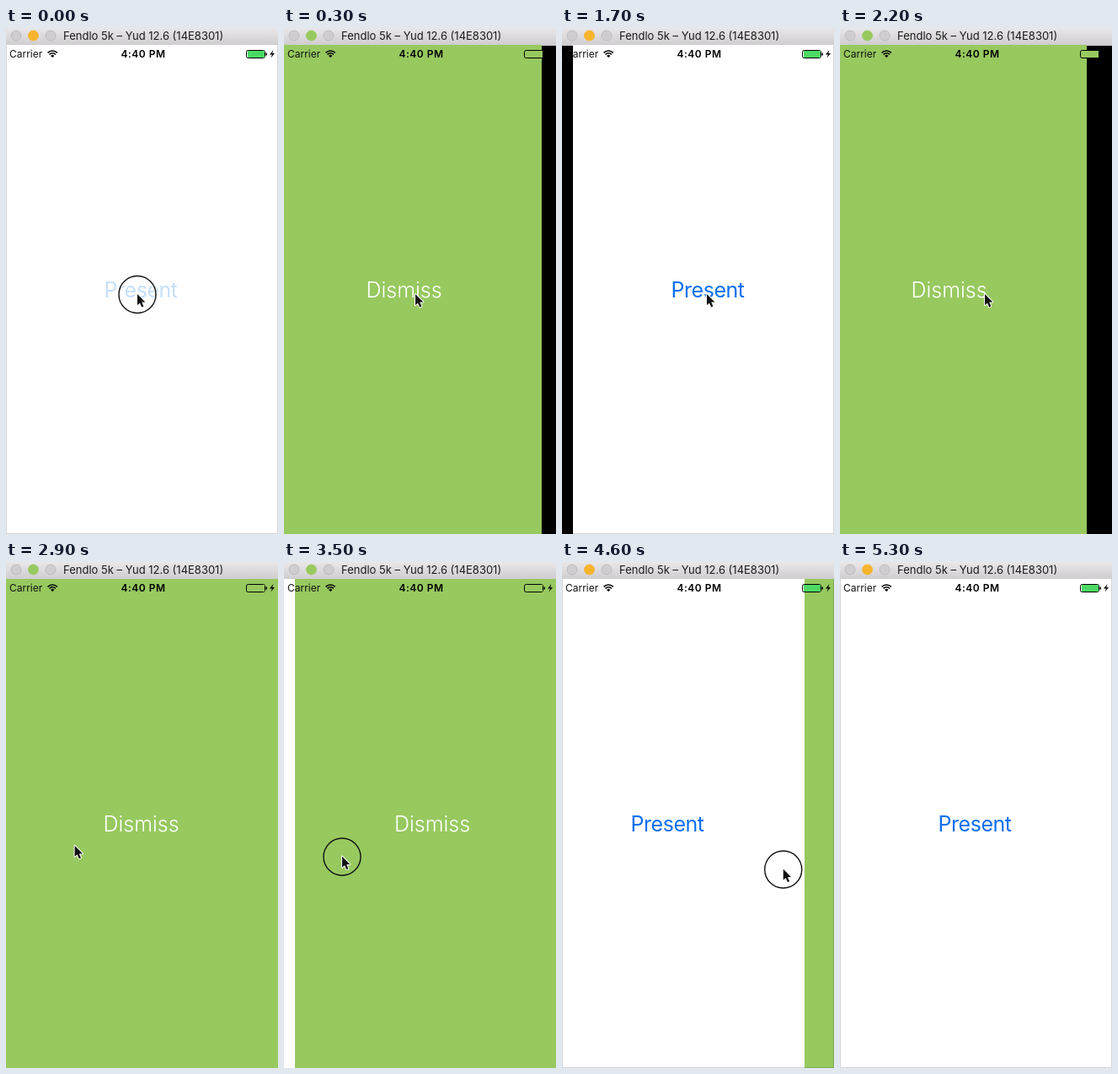
Recreate the animation shown at these times as an HTML page with a canvas. Size 323x599 px, loop 5.4 s.

```html
<!DOCTYPE html>
<html lang="en">
<head>
<meta charset="utf-8">
<style>
html, body { margin: 0; width: 100%; height: 100%; overflow: hidden; background: #fff; }
canvas { display: block; }
</style>
</head>
<body>
<canvas id="stage" width="323" height="599"></canvas>
<script>
const c = document.getElementById('stage').getContext('2d');
const W = 323, H = 599, BAR = 20, LOOP = 5400, STEP = 100;
const GREEN = '#97c95f', BLUE = '#0a6ff0', YELLOW = '#f6b42d';

// Pointer path: time, x, y
const PATH = [
  [0, 156, 315], [700, 156, 315], [1000, 172, 315], [2500, 172, 315],
  [3000, 59, 341], [3300, 60, 348], [3500, 69, 348.5], [3600, 84, 350],
  [4100, 201.5, 361], [4700, 275, 364], [4800, 276, 364], [5200, 340, 366], [LOOP, 340, 366]
];

function pointerAt(t) {
  const i = Math.max(1, PATH.findIndex(p => p[0] >= t));
  const a = PATH[i - 1], b = PATH[i];
  const k = (t - a[0]) / (b[0] - a[0]);
  return { x: a[1] + (b[1] - a[1]) * k, y: a[2] + (b[2] - a[2]) * k };
}

// Underdamped spring from 1 to 0, time in ms
function spring(ms) {
  const s = Math.max(0, ms) / 1000;
  return Math.exp(-6.75 * s) * (Math.cos(9 * s) + 0.75 * Math.sin(9 * s));
}

// Left edge of the green screen
function panelAt(t) {
  if (t < 1219) return W * spring(t - 20);
  if (t < 1850) return W * (1 - spring(t - 1219));
  if (t < 3200) return W * spring(t - 1850);
  const drag = u => Math.max(0, 1.417 * (pointerAt(u).x - 59.8));
  if (t < 4800) return drag(t);
  return W - (W - drag(4800)) * Math.exp((4800 - t) / 110);
}

function rect(x, y, w, h, fill) {
  c.fillStyle = fill;
  c.fillRect(x, y, w, h);
}

function text(str, x, y, font, fill, align = 'left', spacing = 0) {
  c.font = font + ' Inter, sans-serif';
  c.fillStyle = fill;
  c.textAlign = align;
  c.letterSpacing = spacing + 'px';
  c.fillText(str, x, y);
}

function poly(points) {
  c.beginPath();
  points.forEach(([x, y]) => c.lineTo(x, y));
  c.closePath();
}

function circle(x, y, r) {
  c.beginPath();
  c.arc(x, y, r, 0, Math.PI * 2);
}

function titleBar(covered) {
  const g = c.createLinearGradient(0, 0, 0, BAR);
  g.addColorStop(0, '#e9e7e9');
  g.addColorStop(1, '#cfcdcf');
  rect(0, 0, W, BAR, g);
  ['#cfcdcf', covered ? GREEN : YELLOW, '#cfcdcf'].forEach((fill, i) => {
    circle(12 + 20.5 * i, 9, 6);
    c.fillStyle = fill;
    c.fill();
    c.lineWidth = 0.8;
    c.strokeStyle = i === 1 ? fill : '#b8b6b8';
    c.stroke();
  });
  text('Fendlo 5k – Yud 12.6 (14E8301)', 68, 14, '400 13px', '#1c1c1c');
}

function wifi(x, y) {
  c.strokeStyle = '#000';
  c.lineWidth = 1.6;
  [8, 5.2].forEach(r => {
    c.beginPath();
    c.arc(x, y, r, -Math.PI * 0.75, -Math.PI * 0.25);
    c.stroke();
  });
  c.beginPath();
  c.moveTo(x, y);
  c.arc(x, y, 3, -Math.PI * 0.75, -Math.PI * 0.25);
  c.fillStyle = '#000';
  c.fill();
}

function statusBar(charge) {
  text('Carrier', 4, 35, '400 12px', '#111');
  wifi(55.2, 35);
  text('4:40 PM', 163, 35, '600 12px', '#000', 'center', 0.5);
  c.lineWidth = 1;
  c.strokeStyle = '#000';
  c.beginPath();
  c.roundRect(285.5, 26.5, 22, 9, 2);
  c.stroke();
  rect(287, 27, 20, 8, charge);
  rect(308.5, 29.5, 1.5, 3, '#000');
  poly([[317.5, 26], [313, 31.5], [316, 31.5], [314.5, 35.5], [319, 30], [316.2, 30]]);
  c.fillStyle = '#000';
  c.fill();
}

function pointer({ x, y }, pressed, halo) {
  if (pressed) {
    circle(x, y + 0.5, 22);
    if (halo) {
      c.lineWidth = 4;
      c.strokeStyle = 'rgba(255,255,255,.65)';
      c.stroke();
    }
    c.lineWidth = 1.4;
    c.strokeStyle = '#111';
    c.stroke();
  }
  c.save();
  c.translate(x, y);
  poly([[0, 0], [0, 13], [3, 10.4], [5.2, 15.4], [7.4, 14.4], [5.2, 9.6], [9.4, 9.4]]);
  c.lineJoin = 'round';
  c.lineWidth = 2;
  c.strokeStyle = '#fff';
  c.stroke();
  c.fillStyle = '#111';
  c.fill();
  c.restore();
}

function draw(t) {
  const x = Math.round(panelAt(t));
  const tapped = t < 50 || (t >= 1800 && t < 1900);
  const pressed = tapped || (t >= 1100 && t < 1250) || (t >= 3200 && t < 4800);

  rect(0, 0, W, H, '#000');
  rect(0, BAR, W, 1, '#cfcdcf');
  rect(x - W, BAR, W, H, '#fff');
  text('Present', x - W + 160, 319, '400 25px', tapped ? '#c6dff8' : BLUE, 'center', -0.45);
  rect(x, BAR, W + 1, H, GREEN);
  const faded = t >= 1100 && t < 1400;
  text('Dismiss', x + 160.5 + Math.min(2.5, Math.max(0, x)), 319, '300 25px',
    faded ? 'rgba(255,255,255,.78)' : '#fff', 'center');

  if (x > 110) {
    c.lineWidth = 1;
    c.strokeStyle = 'rgba(0,0,0,.16)';
    c.strokeRect(0.5, BAR - 0.5, W - 1, H - BAR);
  }
  titleBar(x < 40);
  statusBar(x > 110 ? '#4cd964' : GREEN);
  pointer(pointerAt(t), pressed, x > 110);
}

function tick(now) {
  draw(Math.floor((now % LOOP) / STEP) * STEP);
  requestAnimationFrame(tick);
}
requestAnimationFrame(tick);
</script>
</body>
</html>
```
